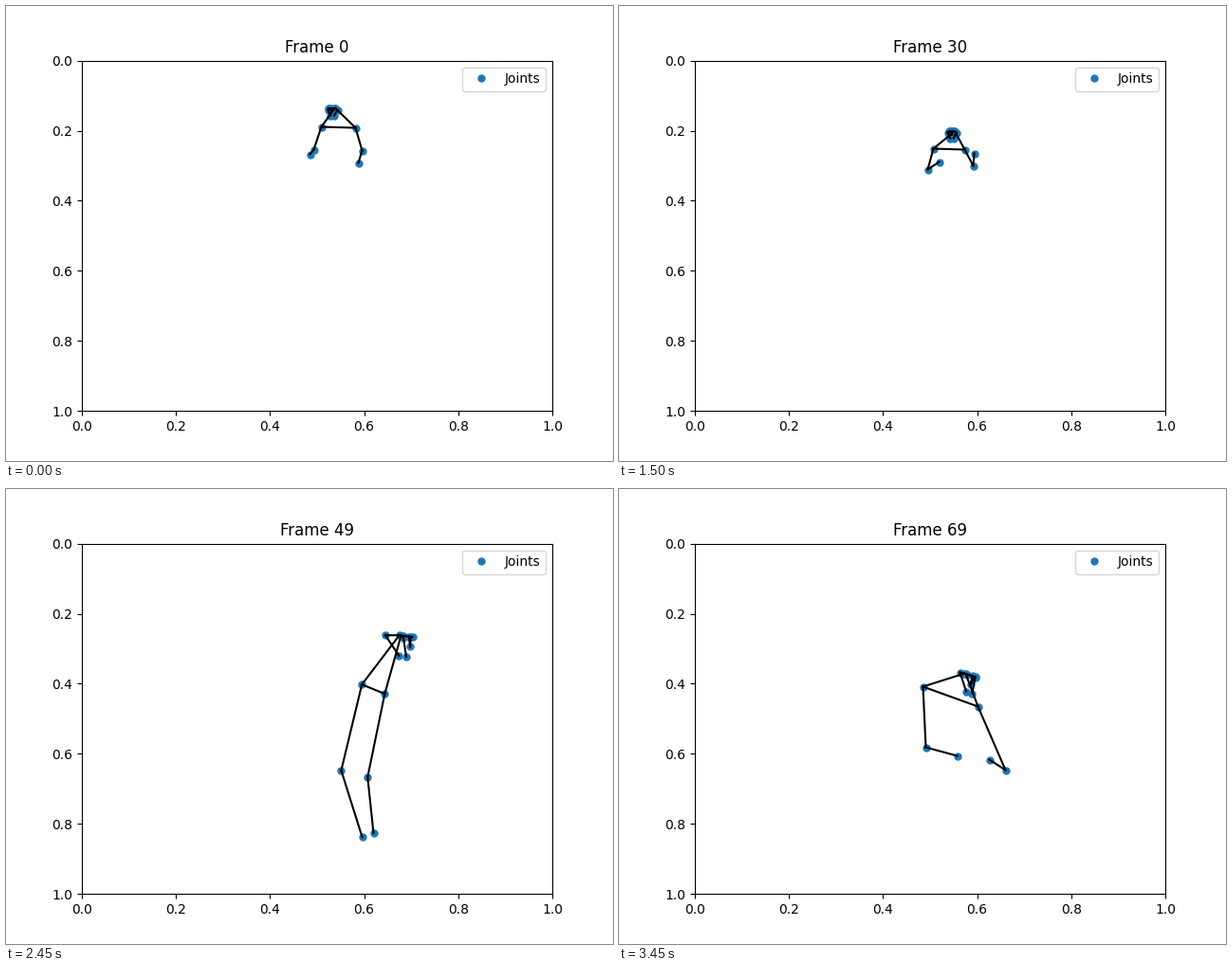
Recreate the animation shown at these times as a matplotlib script. Size 640 px wide and 480 px high, loop 3.5 s.

```python
import numpy as np
import matplotlib.pyplot as plt
from matplotlib.animation import FuncAnimation

FRAMES, STEP = 70, 50

# Head landmarks as (sideways, down, forward) from the point between the ears
NOSE = (0, 0.05, 0.95)
EYES = [(s * x, -0.3, 0.7) for s in (1, -1) for x in (0.33, 0.54, 0.73)]
EARS = [(s, 0, 0) for s in (1, -1)]
MOUTH = [(s * 0.4, 0.65, 0.5) for s in (1, -1)]
HEAD = np.array([NOSE, *EYES, *EARS, *MOUTH])

BONES = [(0, 1), (0, 2), (1, 3), (2, 4), (5, 6), (11, 12), (5, 11), (6, 12)]
BONES += [(i, i + 2) for i in (5, 6, 7, 8, 11, 12, 13, 14)]


def pose(origin, side, down, front, left_arm, right_arm):
    """Project the head along its axes, then add shoulder, elbow and wrist."""
    head = origin + HEAD @ np.array([side, (0, down), front])
    arms = np.stack([left_arm, right_arm], axis=1).reshape(-1, 2)
    return np.vstack([head, arms])


def zoom(points, scale, *centre):
    return centre + scale * (points - centre)


away = pose((344, 109), (-5, 0), 8.2, (-1, 1.4),
            [(332, 127), (324, 151), (320, 156)],
            [(368, 128), (375, 152), (371, 165)])
turned = pose((330.5, 118), (3.5, 0), 10, (-6.4, 2.9),
              [(342, 135), (336, 143), (318, 133)],
              [(355, 132), (367, 153), (368, 163)])
raised = pose((350.5, 133), (-4.5, 0), 7.8, (0, 1.9),
              [(331, 150), (325, 172), (337, 164)],
              [(364, 151), (373, 168), (374, 155)])
facing = pose((297, 129.5), (24, -2.5), 22.4, (-0.7, -6),
              [(367, 201), (390, 299), (395, 382)],
              [(240, 217), (227, 312), (210, 383)])
profile = pose((450, 143), (8, 2), 26.4, (22, 7.7),
               [(418, 209), (396, 309), (405, 382)],
               [(415, 207), (393, 316), (423, 396)])
leaving = pose((338.5, 175), (11.5, 0), 19.4, (8.6, 13.3),
               [(367, 222), (357, 283), (358, 314)],
               [(308, 199), (288, 252), (295, 301)])
bent = pose((367, 195.5), (8, 2.5), 21, (3.5, 9.7),
            [(378, 229), (407, 296), (390, 285)],
            [(320, 208), (323, 272), (356, 281)])

# Poses blend within a run; the picture cuts where the next run starts
RUNS = [
    {0: away, 7: turned, 11: zoom(turned, 1.4, 350, 95), 19: raised},
    {34: zoom(facing, 1.25, 330, 127), 38: facing, 45: profile,
     46: zoom(profile, 1.04, 420, 140), 54: leaving},
    {55: zoom(bent, 0.97, 385, 250), 66: bent},
]


def joints(frame):
    run = [r for r in RUNS if min(r) <= frame][-1]
    times = list(run)
    tracks = np.array(list(run.values())).reshape(len(times), -1).T
    points = np.array([np.interp(frame, times, t) for t in tracks])
    return (points.reshape(-1, 2) - (79.5, 57.1)) / (496, 369.6)


fig, ax = plt.subplots(figsize=(6.4, 4.8), dpi=100)
ax.set_xlim(0, 1)
ax.set_ylim(1, 0)
dots, = ax.plot([], [], 'o', markersize=5, label='Joints')
bones = [ax.plot([], [], 'k-')[0] for _ in BONES]
ax.legend(loc='upper right')
title = ax.set_title('Frame 0')


def draw(frame):
    points = joints(frame)
    dots.set_data(*points.T)
    for line, ends in zip(bones, BONES):
        line.set_data(*points[list(ends)].T)
    title.set_text(f'Frame {frame}')
    return [dots, *bones, title]


anim = FuncAnimation(fig, draw, frames=FRAMES, interval=STEP,
                     repeat=True, repeat_delay=0, blit=False)
plt.show()
```
